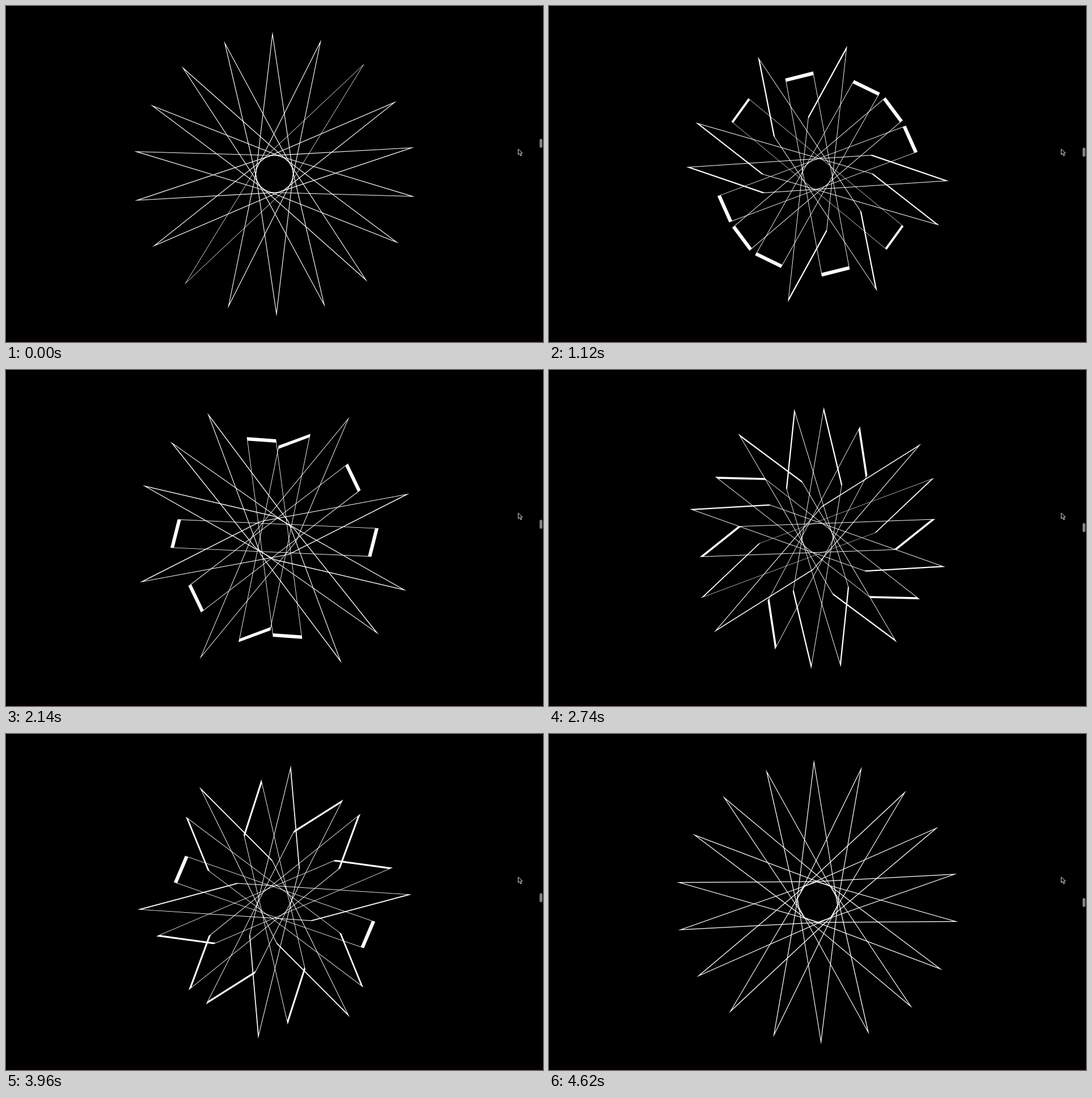
An HTML page with a canvas for the animation above (4660 ms loop, 947 by 592 pixels).

```html
<!DOCTYPE html>
<html lang="en">
<head>
<meta charset="utf-8">
<title>Spinning star</title>
<style>
html, body { margin: 0; width: 100%; height: 100%; overflow: hidden; background: #000; }
canvas { display: block; }
</style>
</head>
<body>
<canvas id="stage" width="947" height="592"></canvas>
<script>
const ctx = document.getElementById('stage').getContext('2d');
const LOOP = 4660;
const CENTER = { x: 473.5, y: 296 };
const SIDE = 50.7, BORDER = 0.88, STRETCH = 7;
const THIN_BOX = 2;
const FULL_TURN = 319.2;
// The boxes widen up to this wheel angle, then start to spin
const SPIN_START = 12, SPIN_RATE = 0.29, START_WIDTH = 0.935;
const DEG = Math.PI / 180;

// Wheel angle in degrees, driven by an uneven scroll
const wheelAngle = curve(
  [0, 340, 1120, 2140, 2740, 3960, 4620],
  [0, 28, 90.4, 173.1, 207.1, 269.9, FULL_TURN]
);

// Spin speed and direction of each box
const spins = [1, -3, -2, 1, -2, 1, -2, 2, -2];

// Monotone cubic through a few points, held after the last one
function curve(xs, ys) {
  const n = xs.length;
  const secant = i => (ys[i + 1] - ys[i]) / (xs[i + 1] - xs[i]);
  const slopes = xs.map((_, i) => {
    if (i === 0) return secant(0);
    if (i === n - 1) return secant(n - 2);
    const a = secant(i - 1), b = secant(i);
    return 2 * a * b / (a + b);
  });
  return x => {
    if (x >= xs[n - 1]) return ys[n - 1];
    let i = 0;
    while (x >= xs[i + 1]) i++;
    const h = xs[i + 1] - xs[i], s = (x - xs[i]) / h, r = 1 - s;
    return ys[i] * (1 + 2 * s) * r * r + slopes[i] * h * s * r * r
      + ys[i + 1] * s * s * (3 - 2 * s) - slopes[i + 1] * h * s * s * r;
  };
}

function drawBox(angle, spin, width, border) {
  ctx.save();
  ctx.translate(CENTER.x, CENTER.y);
  ctx.rotate(angle * DEG);
  ctx.scale(width, STRETCH);
  ctx.rotate((45 + spin) * DEG);
  const inner = SIDE - 2 * border;
  ctx.beginPath();
  ctx.rect(-SIDE / 2, -SIDE / 2, SIDE, SIDE);
  ctx.rect(-inner / 2, -inner / 2, inner, inner);
  ctx.fillStyle = '#fff';
  ctx.fill('evenodd');
  ctx.restore();
}

function drawScrollbar(y) {
  ctx.fillStyle = '#858585';
  ctx.beginPath();
  ctx.roundRect(941, y - 8, 4.8, 16, 2.4);
  ctx.fill();
}

function drawCursor() {
  const outline = [[0, 0], [0, 10], [2.4, 7.9], [4.2, 12], [6, 11.2], [4.3, 7.3], [7.5, 7.1]];
  ctx.save();
  ctx.translate(903.3, 252);
  ctx.beginPath();
  outline.forEach(([x, y]) => ctx.lineTo(x, y));
  ctx.closePath();
  ctx.fillStyle = '#000';
  ctx.fill();
  ctx.strokeStyle = '#e4e4e4';
  ctx.lineWidth = 1;
  ctx.stroke();
  ctx.restore();
}

function draw(t) {
  const wheel = wheelAngle(t), progress = wheel / FULL_TURN;
  const unitSpin = Math.max(0, wheel - SPIN_START) * SPIN_RATE;
  const width = START_WIDTH + (1 - START_WIDTH) * Math.min(1, wheel / SPIN_START);
  ctx.fillStyle = '#000';
  ctx.fillRect(0, 0, 947, 592);
  ctx.fillStyle = '#060002';
  ctx.fillRect(0, 588, 947, 4);
  spins.forEach((spin, i) => {
    const border = i === THIN_BOX ? 0.5 + 0.36 * progress ** 1.5 : BORDER;
    drawBox(wheel + 20 * i - 0.9, spin * unitSpin, width, border);
  });
  drawScrollbar(242 + 55 * progress);
  drawCursor();
}

const start = performance.now();
function tick() {
  draw((performance.now() - start) % LOOP);
  requestAnimationFrame(tick);
}
tick();
</script>
</body>
</html>
```
